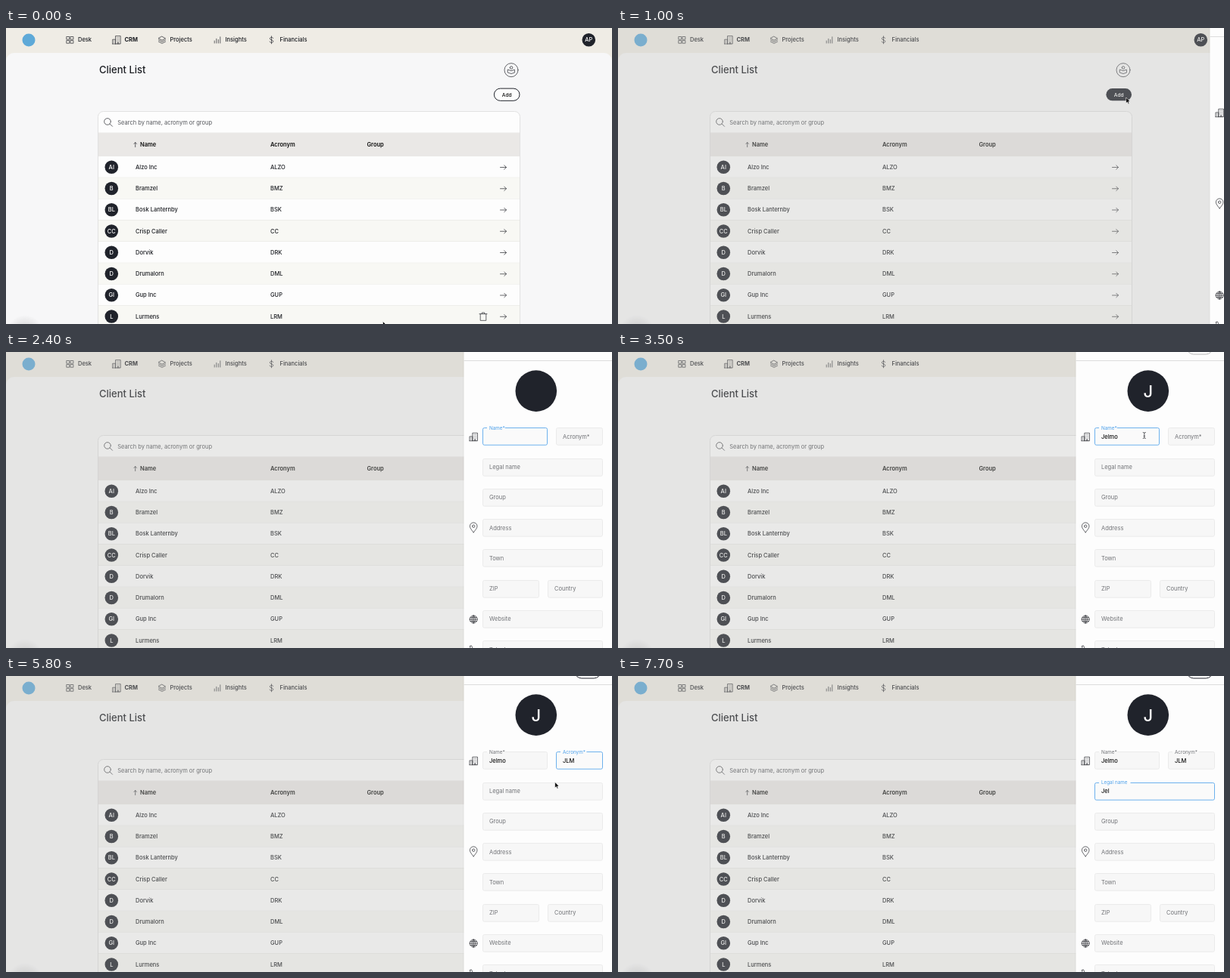
Animation, 800 px wide and 392 px high, one loop 8000 ms. Source, as an HTML page:

```html
<!DOCTYPE html>
<html lang="en">
<head>
<meta charset="utf-8">
<title>Client list</title>
<style>
  html, body { margin: 0; width: 100%; height: 100%; overflow: hidden; background: #f7f7f8; }
  svg { display: block; width: 800px; height: 392px; }
  text { font: 450 7.5px Inter, Roboto, sans-serif; fill: #1c1e23; }
  .icon { fill: none; stroke: #33353a; stroke-width: .75; stroke-linecap: round; stroke-linejoin: round; }
</style>
</head>
<body>
<svg id="stage" viewBox="0 0 800 392">
  <defs>
    <radialGradient id="glow"><stop offset=".3" stop-opacity=".12"/><stop offset="1" stop-opacity="0"/></radialGradient>
  </defs>
  <g id="page"></g>
  <g id="hover"></g>
  <g id="add"></g>
  <rect id="veil" width="800" height="392" fill="#b9b9b7" opacity=".3"/>
  <g id="panel"></g>
  <g id="cursor"></g>
</svg>
<script>
const LOOP = 8000, STEP = 100, SLIDE = 195.5;
const DARK = '#20232b', BLUE = '#4a9fea';
const el = id => document.getElementById(id);
const clamp = v => Math.max(0, Math.min(1, v));
const mix = (a, b, p) => a + (b - a) * p;

const text = (x, y, s, attrs = '') => `<text x="${x}" y="${y}" ${attrs}>${s}</text>`;
const style = (size, weight = 450, fill = '#1c1e23') =>
  `style="font-size:${size}px;font-weight:${weight};fill:${fill}"`;
const rect = (x, y, w, h, fill, attrs = '') =>
  `<rect x="${x}" y="${y}" width="${w}" height="${h}" fill="${fill}" ${attrs}/>`;
const icon = (x, y, d) => `<path class="icon" transform="translate(${x} ${y})" d="${d}"/>`;
const badge = (x, y, r, s, size) => `<circle cx="${x}" cy="${y}" r="${r}" fill="${DARK}"/>` +
  text(x, y + size * .36, s, `text-anchor="middle" ${style(size, 500, '#fff')}`);

// Icons are drawn around their own centre
const ICONS = {
  grid: 'M-4.3-4.3h3.6v3.6h-3.6zM.8-4.3h3.6v3.6H.8zM-4.3.8h3.6v3.6h-3.6zM.8.8h3.6v3.6H.8z',
  building: 'M-5.3 5.2V-.6H-1.5V5.2M-1.5 5.2V-5.2H5.2V5.2H-5.3M-3.5 1.2v.2M-3.5 3.2v.2M.6-3h.3M2.9-3h.3M.6-.8h.3M2.9-.8h.3M.6 1.4h.3M2.9 1.4h.3M1 5.2V3.4h1.8v1.8',
  layers: 'M0-4.5L4.6-2 0 .4-4.6-2zM-4.6 0L0 2.4 4.6 0M-4.6 2.2L0 4.6 4.6 2.2',
  bars: 'M-3.8 4.2V1.2M-1.2 4.2V-1.5M1.3 4.2V-.3M3.8 4.2V-4',
  dollar: 'M0-5V5M2.2-2.3C1.8-4-2.2-4-2.2-1.8-2.2.5 2.3-.4 2.3 1.9 2.3 4-1.9 4.2-2.4 2.2',
  search: 'M3.3-.8A4.3 4.3 0 1 1-5.3-.8 4.3 4.3 0 1 1 3.3-.8M2.2 2.3L5.5 5.6',
  up: 'M0 3V-3M-1.8-1.2L0-3 1.8-1.2',
  right: 'M-4 0H4M1.3-2.7L4 0 1.3 2.7',
  trash: 'M-5-3.5H5M-1.7-3.5V-5.2H1.7V-3.5M-3.8-3.5V5.2H3.8V-3.5',
  reader: 'M-1.8-3a1.8 1.8 0 1 0 3.6 0 1.8 1.8 0 1 0-3.6 0M-4.4-.3L0 1.2 4.4-.3V3.6L0 5-4.4 3.6z',
  pin: 'M0 6.5C-3 2.5-4.8.7-4.8-1.8a4.8 4.8 0 0 1 9.6 0C4.8.7 3 2.5 0 6.5M-1.7-1.8a1.7 1.7 0 1 0 3.4 0 1.7 1.7 0 1 0-3.4 0',
  globe: 'M-5 0a5 5 0 1 0 10 0 5 5 0 1 0-10 0M-5 0H5M0-5V5M-4.2-2.5H4.2M-4.2 2.5H4.2M0-5C-3.2-2-3.2 2 0 5M0-5C3.2-2 3.2 2 0 5',
  phone: 'M-4.5-4.5l2-.6 1.3 2.8-1.4 1.3C-2 .9-.6 2 .9 2.5L2.3 1 5 2.5 4.3 4.8C0 5.4-4.6 0-4.5-4.5'
};
const put = (name, x, y) => icon(x, y, ICONS[name]);

const NAV = [
  ['grid', 84.5, 95, 'Desk'], ['building', 146, 156.5, 'CRM'], ['layers', 206, 216.5, 'Projects'],
  ['bars', 279, 289.5, 'Insights'], ['dollar', 350.5, 361.5, 'Financials']
];
const CLIENTS = [
  ['AI', 'Alzo Inc', 'ALZO'], ['B', 'Bramzel', 'BMZ'], ['BL', 'Bosk Lanternby', 'BSK'],
  ['CC', 'Crisp Caller', 'CC'], ['D', 'Dorvik', 'DRK'], ['D', 'Drumalorn', 'DML'],
  ['GI', 'Gup Inc', 'GUP'], ['L', 'Lurmens', 'LRM']
];
const ROW_TOP = 170, ROW = 28.25;

function drawPage() {
  let s = rect(0, 0, 800, 392, '#efece5') + rect(0, 33, 800, 380, '#f7f7f8', 'rx="11"');
  s += '<circle cx="30" cy="16" r="8.5" fill="#5ea9d8"/>';
  for (const [name, ix, tx, label] of NAV)
    s += put(name, ix, 15.8) + text(tx, 18.4, label, style(7.5, label === 'CRM' ? 700 : 450));
  s += badge(769.3, 15.7, 8.8, 'AP', 7.5);
  s += text(123, 60.3, 'Client List', style(13));
  s += '<circle class="icon" cx="667" cy="55.7" r="9"/>' + put('reader', 667, 55.5);

  s += rect(121.5, 110.5, 557, 300, '#fdfdfd', 'rx="7" stroke="#e1e1e1"');
  s += put('search', 135, 124.7);
  s += text(147.3, 127.6, 'Search by name, acronym or group', style(7.5, 400, '#55575c'));
  s += rect(122, 138.5, 556, 31.5, '#eae8e6') + put('up', 170.7, 154.6);
  [[177, 'Name'], [349, 'Acronym'], [476.5, 'Group']].forEach(([x, label]) =>
    s += text(x, 157, label, style(7.5, 600, '#111')));
  CLIENTS.forEach(([initials, name, code], i) => {
    const y = ROW_TOP + ROW * i, mid = y + 14.2;
    s += rect(122, y, 556, ROW, i % 2 ? '#f8f8f4' : '#fdfdfd');
    s += rect(122, y + ROW - .5, 556, .8, '#e6e6e1');
    s += badge(139.3, mid, 8.8, initials, 7.5);
    s += text(171, mid + 2.6, name) + text(349, mid + 2.6, code) + put('right', 656.5, mid + .3);
  });
  el('page').innerHTML = s + '<circle cx="25" cy="404" r="24" fill="url(#glow)"/>';
}

const rowY = i => 112.2 + 40.25 * i;
// label, x, width, row, focus start, focus end, typed text, key times
const FIELDS = [
  ['Name*', 629, 86, 0, 2200, 4200, 'Jelmo', [2500, 2600, 2700, 3000, 3200]],
  ['Acronym*', 726, 62, 0, 4200, 6400, 'JLM', [4800, 5000, 5300]],
  ['Legal name', 629, 159, 1, 6400, LOOP, 'Jel', [7400, 7500, 7700]],
  ['Group', 629, 159, 2], ['Address', 629, 159, 3], ['Town', 629, 159, 4],
  ['ZIP', 629, 75, 5], ['Country', 715, 73, 5], ['Website', 629, 159, 6], ['Telephone', 629, 159, 7]
];

function drawField(t, [label, x, w, row, from = Infinity, to, value = '', keys = []]) {
  const y = rowY(row), top = Math.floor(y - 11.4) + .5;
  const lift = clamp((t - from + STEP) / 200), focused = t >= from && t < to;
  const typed = value.slice(0, keys.filter(k => t >= k).length);
  const size = mix(7.5, 6.3, lift);
  let s = rect(x + .5, top, w - 1, 22.7, focused ? '#fafafa' : '#f7f7f7',
    `rx="2" stroke="${focused ? BLUE : '#e8e8e8'}" stroke-width=".8"`);
  if (lift) s += rect(x + 6, top - .8, label.length * 3.55 + 6, 1.6, '#fbfbfb');
  s += text(x + 9, mix(y + 2.6, y - 9.4, lift), label, style(size, 400, focused ? BLUE : '#707276'));
  return s + text(x + 9, y + 2.6, typed, style(7.5, 500, '#111'));
}

// CSS "ease" curve, solved by bisection
function ease(p) {
  let lo = 0, hi = 1, m;
  const curve = (a, b) => 3 * a * m * (1 - m) ** 2 + 3 * b * m * m * (1 - m) + m ** 3;
  for (let i = 0; i < 24; i++) {
    m = (lo + hi) / 2;
    if (curve(.25, .25) < p) lo = m; else hi = m;
  }
  return curve(.1, 1);
}

function drawPanel(t) {
  const dx = SLIDE * (1 - ease(clamp((t - 950) / 500)));
  let s = rect(603.5, 0, 1, 392, '#000', 'opacity=".04"');
  s += rect(604.5, 0, 200, 392, '#fdfdfd') + rect(604.5, 11, 200, .9, '#d9d9d9');
  if (t >= 2500)
    s += rect(751, -15, 34, 18, '#fff', `rx="8.8" stroke="${t < 4800 ? '#b5b5b5' : DARK}"`);
  s += badge(699.8, 51.6, 27.3, t < 2500 ? '' : 'J', 22);
  s += put('building', 617.3, 112.5) + put('pin', 617.2, 232.5) + put('globe', 617.2, 354) + put('phone', 617, 394);
  s += FIELDS.map(f => drawField(t, f)).join('');
  el('panel').innerHTML = s;
  el('panel').setAttribute('transform', `translate(${dx} 0)`);
}

const PATH = [
  [0, 497.5, 388.5], [800, 670.7, 92], [1300, 670.7, 92], [1700, 682, 111], [3300, 682, 111],
  [4100, 764, 107.5], [5500, 764, 107.5], [5800, 724.7, 140.5], [6300, 704, 153], [LOOP, 704, 153]
];
const HIDDEN = [[2300, 3400], [4700, 5500], [7300, LOOP]];

function pointer(t) {
  const i = PATH.findIndex(k => k[0] > t), [t0, x0, y0] = PATH[i - 1], [t1, x1, y1] = PATH[i];
  const p = (t - t0) / (t1 - t0), q = p * p * (3 - 2 * p);
  return [mix(x0, x1, q), mix(y0, y1, q)];
}

function drawCursor(t, x, y) {
  const inField = t > 1300 && FIELDS.some(([, fx, w, row]) =>
    x > fx && x < fx + w && Math.abs(y - rowY(row)) < 11.5);
  const hidden = HIDDEN.some(([a, b]) => t >= a && t < b);
  el('cursor').innerHTML = hidden ? '' : inField
    ? icon(x, y, 'M-1.6-4Q0-4 0-3Q0-4 1.6-4M0-3V3M-1.6 4Q0 4 0 3Q0 4 1.6 4M-.8.8H.8')
    : `<path transform="translate(${x} ${y})" d="M0 0V7.6L1.8 6 3 8.8 4.3 8.2 3.1 5.5H5.4z" stroke="#fff" stroke-width=".6"/>`;
}

function drawHover(t, x, y) {
  const row = Math.floor((y - ROW_TOP) / ROW);
  el('hover').innerHTML = row >= 0 && t < 1000 ? put('trash', 630, ROW_TOP + ROW * row + 14.4) : '';
  const over = x > 644 && x < 679 && y > 79 && y < 97;
  el('add').innerHTML =
    rect(644.4, 80.1, 33.6, 16.2, over ? DARK : '#fdfdfd', `rx="8.1" stroke="${over ? 'none' : DARK}"`) +
    text(661.2, 90.5, 'Add', `text-anchor="middle" ${style(6.7, 500, over ? '#fff' : '#111')}`);
}

function frame() {
  const t = Math.floor(performance.now() % LOOP / STEP) * STEP;
  const [x, y] = pointer(t), open = t >= 1000;
  drawHover(t, x, y);
  el('veil').style.display = el('panel').style.display = open ? '' : 'none';
  if (open) drawPanel(t);
  drawCursor(t, x, y);
  requestAnimationFrame(frame);
}

drawPage();
frame();
</script>
</body>
</html>
```
